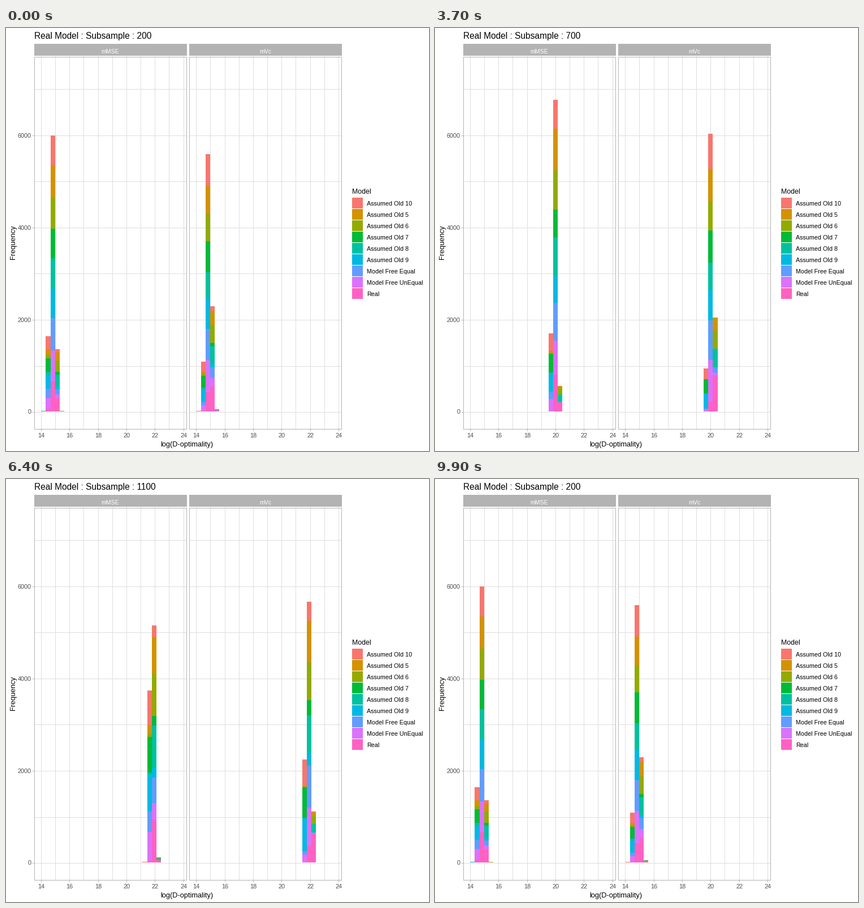
Recreate the animation shown at these times as a matplotlib script. Size 748x748 px, loop 10 s.

```python
import math

import numpy as np
import matplotlib.pyplot as plt
from matplotlib.animation import FuncAnimation
from matplotlib.collections import PolyCollection
from matplotlib.patches import Rectangle

SIZE, DPI = 748, 100
PX = 72 / DPI
GRID, EDGE, TICK = "#DEDEDE", "#B3B3B3", "#4D4D4D"

plt.rcParams["font.family"] = "Liberation Sans"

# Stacking order from the bottom: name, colour, shift of the mean per panel
MODELS = [
    ("Real", "#FF61C3", (0.42, 0.90)),
    ("Model Free UnEqual", "#DB72FB", (-0.11, 0.20)),
    ("Model Free Equal", "#619CFF", (0.00, 0.32)),
    ("Assumed Old 9", "#00B9E3", (-0.23, -0.17)),
    ("Assumed Old 8", "#00C19F", (0.38, 0.60)),
    ("Assumed Old 7", "#00BA38", (-0.22, -0.14)),
    ("Assumed Old 6", "#93AA00", (0.34, 0.58)),
    ("Assumed Old 5", "#D39200", (0.18, 0.50)),
    ("Assumed Old 10", "#F8766D", (-0.20, -0.08)),
]
PANELS = ("mMSE", "mVc")
SAMPLES = range(200, 1600, 100)
BINS, RUNS = 30, 1000


def histogram(mean, sd):
    """Expected runs per bin for a normal distribution, in bin units."""
    cdf = [0.5 + 0.5 * math.erf((b - mean) / (sd * math.sqrt(2)))
           for b in range(BINS + 1)]
    n = np.round(RUNS * np.diff(cdf))
    return np.where(n > 1, n, 0)


def sample_counts(sample):
    """Counts by panel, model and bin; the mean grows with the log size."""
    center = 2.42 + 12.68 * math.log(sample / 200)
    stretch = (sample / 600) ** 0.27
    sd = 0.27 + 0.21 * (200 / sample) ** 1.5
    return [[histogram(center + stretch * shift[p], sd)
             for _, _, shift in MODELS] for p in range(len(PANELS))]


COUNTS = np.array([sample_counts(s) for s in SAMPLES])


def build_timeline():
    """(state, progress) per frame: hold, then a short linear tween."""
    steps = []
    for i in range(len(SAMPLES)):
        n = 4 if i < 3 else 3
        steps += [(i, 0.0)] * 5 + [(i, k / n) for k in range(1, n)]
    steps.remove((6, 2 / 3))  # this tween jumps to its end
    return steps[1:] + steps[:1]


TIMELINE = build_timeline()

LEFTS = (50, 324.35)
WIDTH, TOP, BOTTOM = 268.6, 50, 708
BAR0, BAR_W = 12.35, 8.14
BASE, UNIT = 678.1, 0.08155


def y_of(n):
    return BASE - n * UNIT


def x_of(value, left):
    return left + 11.9 + (value - 14) * 25.17


fig = plt.figure(figsize=(SIZE / DPI, SIZE / DPI), dpi=DPI, facecolor="white")
ax = fig.add_axes([0, 0, 1, 1])
ax.set_xlim(0, SIZE)
ax.set_ylim(SIZE, 0)
ax.axis("off")


def label(x, y, text, size, color="black", va="baseline", **kw):
    return ax.text(x, y, text, fontsize=size * PX, color=color, va=va, **kw)


def line(xs, ys, color):
    ax.plot(xs, ys, color=color, lw=PX, zorder=1, antialiased=False,
            solid_capstyle="butt")


def box(x, y, w, h, color):
    ax.add_patch(Rectangle((x, y), w, h, fc=color, lw=0, antialiased=False))


for left, name in zip(LEFTS, PANELS):
    x0, x1 = round(left), round(left + WIDTH)
    box(x0, 28, x1 - x0 + 1, 21, EDGE)
    label(left + WIDTH / 2, 44.5, name, 10.5, "white", ha="center")
    for v in range(14, 25):
        x = round(x_of(v, left)) + 0.5
        line([x, x], [TOP, BOTTOM], GRID)
        if v % 2 == 0:
            line([x, x], [BOTTOM, BOTTOM + 4], EDGE)
            label(x, 724, str(v), 10.9, TICK, ha="center")
    for n in range(0, 8000, 1000):
        y = round(y_of(n)) + 0.5
        line([x0, x1], [y, y], GRID)
    ax.add_patch(Rectangle((x0 + 0.5, TOP + 0.5), x1 - x0, BOTTOM - TOP,
                           fill=False, ec=EDGE, lw=PX, zorder=4,
                           antialiased=False))

for n in range(0, 8000, 2000):
    y = round(y_of(n)) + 0.5
    line([47, 50], [y, y], EDGE)
    label(45, y + 4, str(n), 10.9, TICK, ha="right")

label(319.5, 740, "log(D-optimality)", 12.8, ha="center")
label(13, 379, "Frequency", 12.7, ha="center", va="center", rotation=90)
label(612, 293, "Model", 12.4)
for i, (name, color, _) in enumerate(reversed(MODELS)):
    y = 300 + 20 * i
    box(612, y, 19, 19, color)
    label(638, y + 14, name, 10.8)

title = label(50, 19, "", 15.5)
bars = PolyCollection([], linewidths=0, antialiaseds=False, zorder=3)
ax.add_collection(bars, autolim=False)


def update(frame):
    i, t = TIMELINE[frame]
    j = (i + 1) % len(SAMPLES)
    now = (1 - t) * COUNTS[i] + t * COUNTS[j]
    tops = np.cumsum(now, axis=1)
    verts, fills = [], []
    for p, m, b in zip(*np.nonzero(now)):
        x = LEFTS[p] + BAR0 + b * BAR_W
        x0, x1 = round(x), round(x + BAR_W)
        y1 = round(y_of(tops[p, m, b]))
        y0 = round(y_of(tops[p, m, b] - now[p, m, b]))
        verts.append([(x0, y0), (x1, y0), (x1, y1), (x0, y1)])
        fills.append(MODELS[m][1])
    bars.set_verts(verts)
    bars.set_facecolor(fills)
    title.set_text(f"Real Model : Subsample : {SAMPLES[j if t > 0.5 else i]}")
    return bars, title


anim = FuncAnimation(fig, update, frames=len(TIMELINE), interval=100,
                     repeat=True, repeat_delay=0, blit=False)
plt.show()
```
